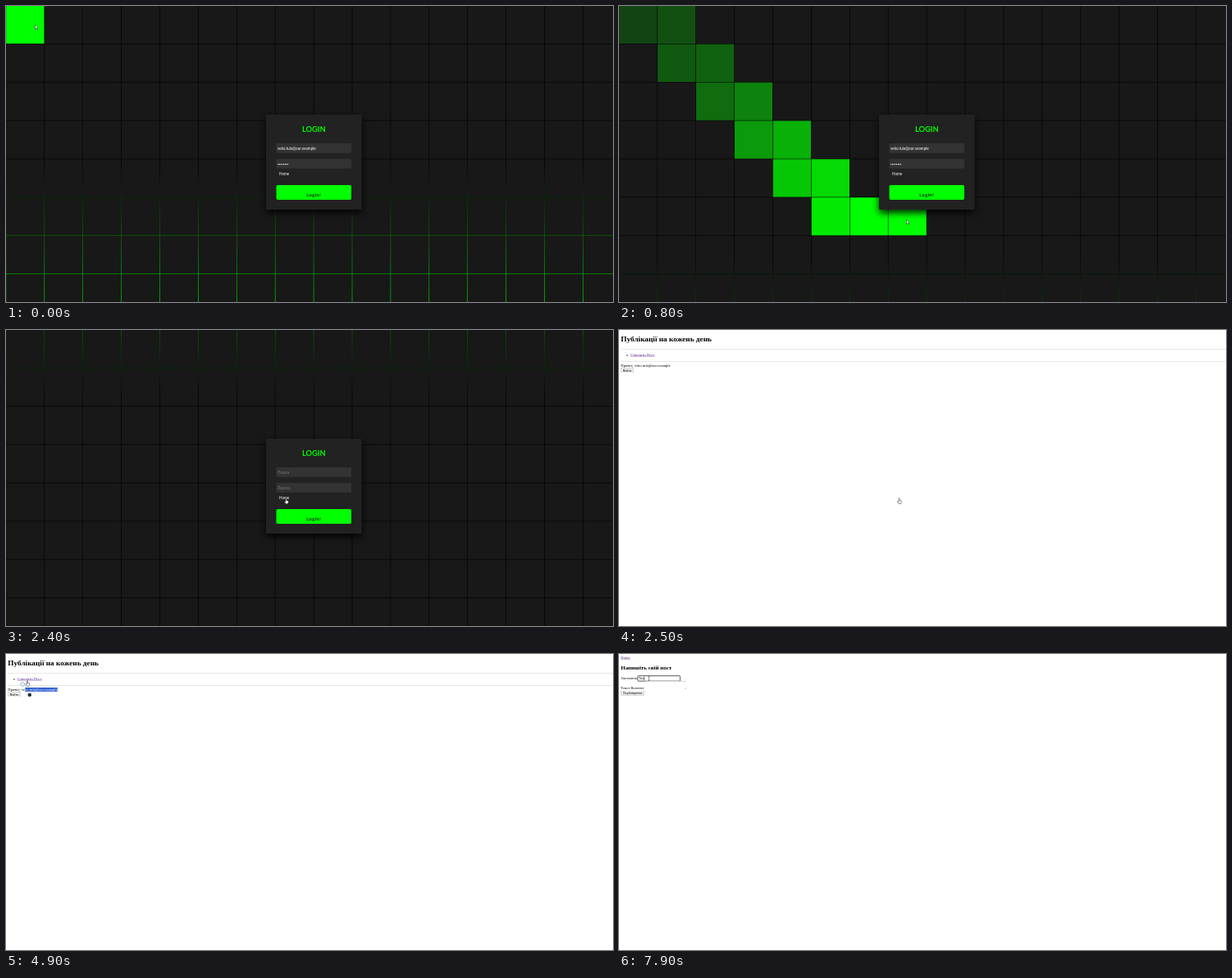
Write an HTML page with a canvas that moves like this. It is 740 px wide and 362 px high and loops after 8 s.

```html
<!DOCTYPE html>
<html lang="uk">
<head>
<meta charset="utf-8">
<title>Login and post</title>
<style>
html, body { margin: 0; width: 100%; height: 100%; overflow: hidden; background: #fff; }
#stage { position: relative; width: 740px; height: 362px; overflow: hidden; }
#stage > * { position: absolute; left: 0; top: 0; }
svg text { font: 4.62px Lato, sans-serif; fill: #fff; }
#card { filter: drop-shadow(0 4px 4px rgba(0, 0, 0, .85)); }
.page {
  width: 2552px; padding: 0 8px; transform: scale(.2890625); transform-origin: 0 0;
  font: 16px "Liberation Serif", serif; color: #000;
}
#post { padding-top: 8px; }
.page a { color: #551a8b; text-decoration: underline; }
.page button, #field { font: 13.333px "Liberation Sans", sans-serif; }
mark { background: #2f5fd0; color: #fff; }
#field {
  display: inline-block; box-sizing: border-box; width: 177px; height: 21px;
  padding: 1px 2px; border: 1px solid #767676; line-height: 17px; white-space: pre;
}
#field.focus { outline: 2px solid #101010; border-radius: 2px; }
#field.typed::after { content: ""; border-left: 2px solid #000; }
textarea { box-sizing: border-box; width: 175px; height: 36px; }
</style>
</head>
<body>
<div id="stage">
  <canvas id="grid" width="740" height="362"></canvas>
  <svg id="login" width="740" height="362">
    <rect id="card" x="317" y="133" width="116.5" height="116" rx="1" fill="#222"/>
    <text x="375.3" y="153.7" text-anchor="middle" style="font-size:9.25px;font-weight:700;fill:#0f0">LOGIN</text>
    <g fill="#333">
      <rect x="329.5" y="168" width="91.5" height="11.7" rx="1.3"/>
      <rect x="329.5" y="187" width="91.5" height="11.7" rx="1.3"/>
    </g>
    <text id="mail" x="331" y="175.5"></text>
    <text id="pass" x="331" y="194.6"></text>
    <text x="333" y="206.8">Home</text>
    <rect x="329.5" y="219" width="91.5" height="18" rx="2" fill="#0f0"/>
    <text x="375.3" y="233" text-anchor="middle" style="font-size:5.6px;font-weight:700;fill:#0b2a0b;letter-spacing:.5px">Login!</text>
  </svg>

  <div class="page" id="list">
    <h1>Публікації на кожень день</h1>
    <hr>
    <ul><li><a>Створити Пост</a></li></ul>
    <hr>
    <span id="plain"></span><mark id="marked"></mark><br>
    <button>Войти</button>
  </div>

  <div class="page" id="post">
    <a>Home</a>
    <h2>Напишіть свій пост</h2>
    Заголовок <span id="field"></span><br>
    Текст Контент <textarea></textarea><br>
    <button>Опублікувати</button>
  </div>

  <svg width="740" height="362">
    <circle id="badge" cx="28.8" cy="50" r="2.3" fill="#263046"/>
    <circle id="busy" cx="20.2" cy="37" r="2.4" fill="#eef6fb" stroke="#8db4d0" stroke-width=".9"/>
    <path id="cursor" stroke="#222" stroke-width=".5" fill="#fff"/>
  </svg>
</div>

<script>
const $ = id => document.getElementById(id);
const ctx = $('grid').getContext('2d');
const LOOP = 8000, STEP = 100, RELOAD = 1900, LIST = 2500, POST = 6200;
const PITCH = 46.9, GAP = .6, HEIGHT = 362;
const MAIL = 'veko.tula@our.example', GREETING = 'Привет, ' + MAIL;

const SHAPES = {
  arrow: 'M-1.5-3v5l1.2-1 .8 2 .8-.4-.8-1.8h1.7z',
  hand: 'M-1 .9V-3q.5-.7 1 0V-.6l2.2.5V1.5l-.7 1.9h-2.6l-1.5-2.6q.4-.9 1.6.2z',
  beam: 'M-.9-2.4h1.8M0-2.4v4.8M-.9 2.4h1.8'
};

// time, x, y, shape used until the next key
const PATH = [
  [0, 37, 26, 'arrow'], [120, 70, 47, 'arrow'], [250, 141, 117, 'arrow'],
  [410, 188, 164, 'arrow'], [600, 258, 235, 'arrow'], [770, 328, 257, 'arrow'],
  [810, 360, 267, 'arrow'], [920, 372, 248, 'arrow'], [1000, 380, 237, 'hand'],
  [1900, 380, 237, 'arrow'], [2200, 344, 212, 'hand'], [2400, 342, 209, 'hand'],
  [2600, 342, 209, 'arrow'], [3400, 38, 60, 'arrow'], [3500, 44, 60, 'arrow'],
  [3900, 66, 44, 'beam'], [4000, 66, 44, 'beam'], [4300, 22.5, 44, 'beam'],
  [4400, 22.5, 44, 'arrow'], [4700, 26.5, 36, 'arrow'], [4900, 26.5, 36, 'hand'],
  [5499, 26.5, 36, 'hand'], [5500, 57, 15, 'beam'], [6200, 57, 15, 'beam'],
  [6700, 36, 30, 'beam'], [6900, 36.5, 30, 'beam'], [8000, 36.5, 30, 'beam']
];

function pointer(t) {
  const i = PATH.findIndex(key => key[0] > t);
  const [t0, x0, y0, shape] = PATH[i - 1], [t1, x1, y1] = PATH[i];
  const k = (t - t0) / (t1 - t0);
  return { x: x0 + (x1 - x0) * k, y: y0 + (y1 - y0) * k, shape };
}

// CSS "ease", solved by bisection
function ease(x) {
  let lo = 0, hi = 1, s = .5;
  for (let i = 0; i < 16; i++) {
    s = (lo + hi) / 2;
    if (.75 * s * (1 - s) + s ** 3 < x) lo = s; else hi = s;
  }
  return .3 * s * (1 - s) ** 2 + 3 * s * s * (1 - s) + s ** 3;
}

const overCard = p => p.x > 317 && p.x < 433.5 && p.y > 133 && p.y < 249;

function lastHover(t) {
  const seen = {};
  if (t >= RELOAD) return seen;
  for (let s = 0; s <= t; s += 5) {
    const p = pointer(s);
    if (!overCard(p)) seen[Math.floor(p.x / PITCH) + ',' + Math.floor(p.y / PITCH)] = s;
  }
  return seen;
}

function drawGrid(t) {
  const phase = t < RELOAD ? (t + 3840) % 5000 : t - 1850;
  const top = -HEIGHT + phase / 5000 * 2 * HEIGHT;
  const glow = ctx.createLinearGradient(0, top, 0, top + HEIGHT);
  ['#000', '#0f0', '#000'].forEach((color, i) => glow.addColorStop(i / 2, color));
  ctx.fillStyle = '#000';
  ctx.fillRect(0, 0, 740, HEIGHT);
  ctx.fillStyle = glow;
  ctx.fillRect(0, top, 740, HEIGHT);

  const seen = lastHover(t);
  for (let row = 0; row < 8; row++) for (let col = 0; col < 16; col++) {
    const left = seen[col + ',' + row];
    const lit = left === undefined ? 0 : 1 - ease(Math.min(1, (t - left) / 1500));
    const dim = 24 * (1 - lit);
    ctx.fillStyle = `rgb(${dim},${dim + 255 * lit},${dim})`;
    ctx.fillRect(col * PITCH + .2, row * PITCH - .3, PITCH - GAP, PITCH - GAP);
  }
}

function show(id, visible) { $(id).style.display = visible ? '' : 'none'; }

function fillField(id, text, placeholder, filled) {
  $(id).textContent = filled ? text : placeholder;
  $(id).style.fill = filled ? '#fff' : '#777';
}

function render(t) {
  const login = t < LIST, list = !login && t < POST;
  show('grid', login);
  show('login', login);
  show('list', list);
  show('post', t >= POST);
  show('badge', list && t >= 4500);
  show('busy', t >= 4500 && t < 5500);

  if (login) {
    drawGrid(t);
    fillField('mail', MAIL, 'Пошта', t < RELOAD);
    fillField('pass', '••••••••', 'Пароль', t < RELOAD);
    $('pass').style.fontSize = t < RELOAD ? '2.9px' : '';
  }

  const drag = Math.min(1, Math.max(0, (t - 4000) / 300));
  const split = Math.round(GREETING.length + (10 - GREETING.length) * drag);
  $('plain').textContent = GREETING.slice(0, split);
  $('marked').textContent = GREETING.slice(split);

  $('field').textContent = t >= 7900 ? 'Тес' : t >= 7700 ? 'Т' : '\u200b';
  $('field').className = (t >= 6600 ? 'focus' : '') + (t >= 7700 ? ' typed' : '');

  const p = pointer(t);
  $('cursor').setAttribute('d', SHAPES[p.shape]);
  $('cursor').setAttribute('transform', `translate(${p.x} ${p.y})`);
}

const start = performance.now();
function frame() {
  const t = (performance.now() - start) % LOOP;
  render(Math.floor(t / STEP) * STEP);
  requestAnimationFrame(frame);
}
frame();
</script>
</body>
</html>
```
